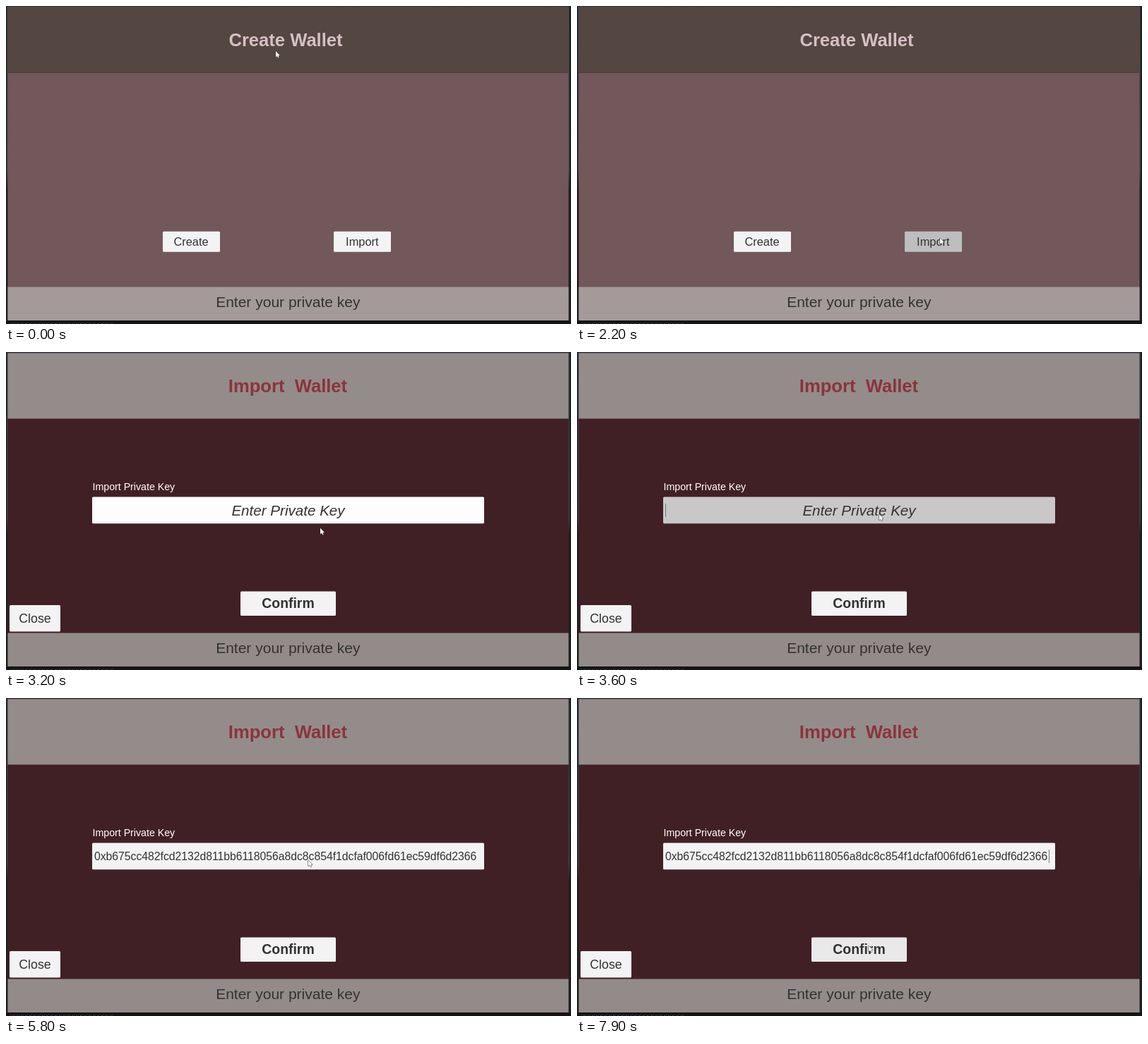
Recreate the animation shown at these times as an HTML page with a canvas. Size 800 by 451 pixels, loop 8000 ms.

```html
<!DOCTYPE html>
<html lang="en">
<head>
<meta charset="utf-8">
<title>Import wallet</title>
<style>
html, body { margin: 0; width: 100%; height: 100%; overflow: hidden; background: #141416; }
canvas { display: block; font-kerning: none; }
</style>
</head>
<body>
<canvas id="stage" width="800" height="451"></canvas>
<script>
const ctx = document.getElementById('stage').getContext('2d');
const LOOP = 8000, STEP = 100;
const OPEN = 2300, FOCUS = 3500, PASTE = 5100, BLINK = 588;
const KEY = '0xb675cc482fcd2132d811bb6118056a8dc8c854f1dcfaf006fd61ec59df6d2366';
const INK = '#323232';

// Pointer moves: start, end, target x, target y
const moves = [
  [700, 1700, 514, 329],
  [2700, 3400, 428, 230],
  [6950, 7600, 413, 351]
];

function rect(x, y, w, h, color) {
  ctx.fillStyle = color;
  ctx.fillRect(x, y, w, h);
}

function text(str, x, y, size, color = INK, style = '', align = 'center') {
  ctx.font = `${style} ${size}px "Liberation Sans", Arial, sans-serif`;
  ctx.textAlign = align;
  ctx.fillStyle = color;
  ctx.fillText(str, x, y);
}

function box(x, y, w, h, color) {
  ctx.fillStyle = color;
  ctx.beginPath();
  ctx.roundRect(x, y, w, h, 1.5);
  ctx.fill();
}

function pointerAt(t) {
  let x = 382, y = 64;
  for (const [start, end, tx, ty] of moves) {
    const p = Math.min(1, Math.max(0, (t - start) / (end - start)));
    const e = p * p * (3 - 2 * p);
    x += (tx - x) * e;
    y += (ty - y) * e;
  }
  return [x, y];
}

function drawPointer(x, y) {
  ctx.save();
  ctx.translate(x, y);
  ctx.beginPath();
  for (const [px, py] of [[0, 0], [0, 8.6], [2, 6.9], [3.2, 9.6], [4.6, 9], [3.4, 6.4], [5.8, 6.3]]) ctx.lineTo(px, py);
  ctx.closePath();
  ctx.lineWidth = 1;
  ctx.strokeStyle = '#2a2a2a';
  ctx.stroke();
  ctx.fillStyle = '#fff';
  ctx.fill();
  ctx.restore();
}

function drawWindow(header, body, footer) {
  rect(0, 0, 800, 451, '#141416');
  const edge = ctx.createLinearGradient(0, 0, 0, 260);
  edge.addColorStop(0, '#2b3440');
  edge.addColorStop(0.9, '#3f444b');
  edge.addColorStop(1, '#202021');
  rect(0, 0, 800, 446, '#1d1e21');
  rect(1, 0, 797, 446, edge);
  for (let x = 6; x < 153; x += 3) rect(x, 449 + x * 7 % 2, 1 + x % 2, 1, '#464648');
  rect(2.5, 1.5, 794, 444.5, body);
  rect(2.5, 1.5, 794, 93, header);
  rect(2.5, 398.5, 794, 47.5, footer);
  text('Enter your private key', 399.3, 427, 21);
}

function drawCreate(t, x, y) {
  drawWindow('#544641', '#72575b', '#a49a9a');
  rect(2.5, 94, 794, 1, '#4b3d3a');
  text('Create Wallet', 396, 57, 25.6, '#d5c0c4', 'bold');
  const hover = x > 464 && y > 320;
  box(222, 319.7, 81, 29, '#f3f3f3');
  box(464, 319.7, 81, 29, t >= 2200 ? '#bebebe' : hover ? '#e9e9e9' : '#f3f3f3');
  text('Create', 262, 340, 16.4);
  text('Import', 504.3, 340, 16.4);
}

function drawImport(t, x, y) {
  drawWindow('#948c8a', '#412025', '#928b89');
  text('Import  Wallet', 399, 57, 25.6, '#8a343f', 'bold');
  text('Import Private Key', 122.5, 196, 14.2, '#fff', '', 'left');

  const overField = y > 205 && y < 243;
  const pressed = t >= FOCUS && t < 3700;
  box(122, 205.6, 555, 37.6, pressed ? '#c8c8c8' : overField || t >= FOCUS ? '#f3f3f3' : '#fdfdfd');
  const pasted = t >= PASTE;
  if (pasted) text(KEY, 125, 230, 15.72, INK, '', 'left');
  else text('Enter Private Key', 399.5, 232, 20.6, INK, 'italic');
  const since = t - (pasted ? PASTE : FOCUS);
  if (since >= 0 && since % (2 * BLINK) < BLINK) rect(pasted ? 668 : 125, 215, 1, 19, '#777');

  box(332, 339.5, 135, 34.5, y > 340 && t > 6900 ? '#e9e9e9' : '#f3f3f3');
  text('Confirm', 399.5, 363, 19.4, INK, 'bold');
  box(5, 359, 72, 37.5, '#f3f3f3');
  text('Close', 41, 384, 17.8);
}

function frame(now) {
  const t = Math.floor(now % LOOP / STEP) * STEP;
  const [x, y] = pointerAt(t);
  (t < OPEN ? drawCreate : drawImport)(t, x, y);
  drawPointer(x, y);
  requestAnimationFrame(frame);
}
requestAnimationFrame(frame);
</script>
</body>
</html>
```
